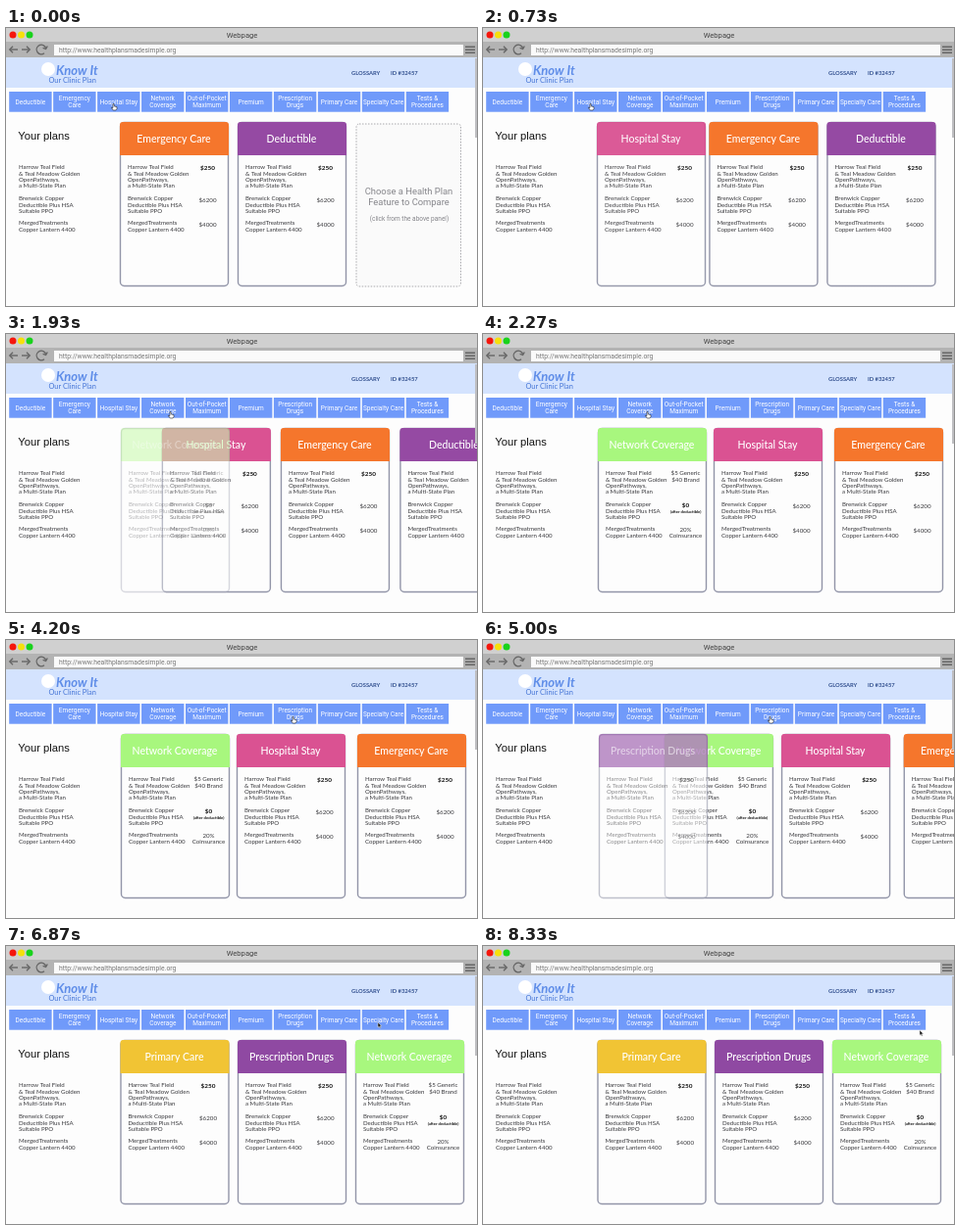
Recreate the animation shown at these times as an HTML page with a canvas. Size 480 by 284 pixels, loop 8.39 s.

```html
<!DOCTYPE html>
<html lang="en">
<head>
<meta charset="utf-8">
<title>Webpage</title>
<style>
html, body { margin: 0; width: 100%; height: 100%; overflow: hidden; background: #fdfdfd; }
canvas { display: block; width: 480px; height: 284px; }
</style>
</head>
<body>
<canvas id="stage"></canvas>
<script>
const LOOP = 8390, W = 480, H = 284;
const canvas = document.getElementById('stage');
const dpr = window.devicePixelRatio || 1;
canvas.width = W * dpr;
canvas.height = H * dpr;
const ctx = canvas.getContext('2d');

const LATO = 'Lato, sans-serif', ROBOTO = 'Roboto, sans-serif';
const ARIAL = '"Liberation Sans", Arial, sans-serif';
const INK = '#38383c';

const NAV = ['Deductible', 'Emergency|Care', 'Hospital Stay', 'Network|Coverage',
  'Out-of-Pocket|Maximum', 'Premium', 'Prescription|Drugs', 'Primary Care',
  'Specialty Care', 'Tests &|Procedures'];

const PLANS = [
  [142, ['Harrow Teal Field', '& Teal Meadow Golden', 'OpenPathways,', 'a Multi-State Plan']],
  [174, ['Brenwick Copper', 'Deductible Plus HSA', 'Suitable PPO']],
  [199, ['MergedTreatments', 'Copper Lantern 4400']]
];

const COLORS = {
  'Deductible': '#954aa3',
  'Emergency Care': '#f5762c',
  'Hospital Stay': '#da5292',
  'Network Coverage': '#a8f77e',
  'Prescription Drugs': '#8f49a2',
  'Primary Care': '#f1c434'
};

// Each step inserts a card on the left and pushes the others right.
const STEPS = [
  { start: -1000, end: -500, xs: [116, 236, 480], cards: ['Emergency Care', 'Deductible'] },
  { start: 270, end: 800, xs: [116, 236, 356], cards: ['Hospital Stay', 'Emergency Care', 'Deductible'] },
  { start: 1720, end: 2240, xs: [117, 235, 358], cards: ['Network Coverage', 'Hospital Stay', 'Emergency Care'] },
  { start: 4700, end: 5250, xs: [118, 236, 356], cards: ['Prescription Drugs', 'Network Coverage', 'Hospital Stay'] },
  { start: 6330, end: 6800, xs: [116.5, 236, 356], cards: ['Primary Care', 'Prescription Drugs', 'Network Coverage'] }
];

const POINTER = [
  [0, 110, 80], [900, 110, 80], [1400, 168, 82], [2900, 168, 82], [3950, 293, 81],
  [5250, 293, 81], [5950, 337, 80], [6500, 337, 80], [6850, 380, 80],
  [7400, 380, 80], [8200, 446, 88]
];
const CLICKS = [80, 1610, 4290, 6120];
const CLICK_LENGTH = 230;

const clamp = v => Math.min(1, Math.max(0, v));
const ease = v => v * v * (3 - 2 * v);
const mix = (a, b, p) => a + (b - a) * p;

function text(str, x, y, size, { color = INK, font = LATO, style = '', align = 'left' } = {}) {
  ctx.font = `${style} ${size}px ${font}`;
  ctx.fillStyle = color;
  ctx.textAlign = align;
  ctx.textBaseline = 'alphabetic';
  ctx.fillText(str, x, y + size * 0.36);
}

function box(x, y, w, h, color) {
  ctx.fillStyle = color;
  ctx.fillRect(x, y, w, h);
}

function disc(x, y, r, color) {
  ctx.fillStyle = color;
  ctx.beginPath();
  ctx.arc(x, y, r, 0, Math.PI * 2);
  ctx.fill();
}

function line(color, width, ...points) {
  ctx.strokeStyle = color;
  ctx.lineWidth = width;
  ctx.beginPath();
  points.forEach(([x, y]) => ctx.lineTo(x, y));
  ctx.stroke();
}

function drawBrowser() {
  box(0, 0, W, 14, '#d0d0d0');
  box(0, 14, W, 16, '#b3b3b3');
  disc(7, 7, 3.5, '#f5160c');
  disc(15.5, 7, 3.5, '#f6e00c');
  disc(24, 7, 3.5, '#19d21c');
  text('Webpage', 240.5, 7.3, 7.6, { font: ROBOTO, color: '#444', align: 'center' });

  const grey = '#666';
  line(grey, 1.4, [12, 22], [4, 22]);
  line(grey, 1.4, [7, 18.8], [3.8, 22], [7, 25.2]);
  line(grey, 1.4, [16, 22], [24, 22]);
  line(grey, 1.4, [21, 18.8], [24.2, 22], [21, 25.2]);
  ctx.beginPath();
  ctx.arc(36, 22, 4.8, 0.9, Math.PI * 1.92);
  ctx.stroke();
  line(grey, 1.4, [42.3, 18.5], [40.6, 21.5], [37.6, 20.4]);

  box(49, 17, 417, 11, '#fafafa');
  text('http://www.healthplansmadesimple.org', 54, 22.4, 6.8, { font: ROBOTO, color: '#777' });
  for (let i = 0; i < 3; i++) box(468, 18.5 + i * 3, 10, 1.5, grey);
}

function drawHeader() {
  box(0, 30, W, 31, '#d4e3fe');
  disc(43, 42, 7, '#ffffff');
  text('Know It', 51, 43.5, 13, { style: 'italic bold', color: '#5f8de8' });
  text('Our Clinic Plan', 43.5, 53.4, 7.4, { color: '#4474d6' });
  const navy = { font: LATO, style: 'bold', color: '#32508f' };
  text('GLOSSARY', 352, 46.3, 5.8, navy);
  text('ID #32457', 392, 46.3, 5.8, navy);
}

function drawNav() {
  NAV.forEach((label, i) => {
    const x = 3.2 + i * 44.95, lines = label.split('|');
    box(x, 65, 43.4, 20.7, '#709afa');
    lines.forEach((str, n) => {
      const y = 75.6 + (n - (lines.length - 1) / 2) * 7;
      text(str, x + 21.7, y, 6.5, { font: ROBOTO, color: '#fff', align: 'center' });
    });
  });
}

function drawPlans(x) {
  for (const [top, lines] of PLANS) {
    lines.forEach((str, i) => text(str, x, top + i * 6.4, 6.1));
  }
}

function drawPrices(name, x) {
  const put = (str, y, size = 6.2, style = '') =>
    text(str, x, y, size, { align: 'center', style, color: style ? '#111' : INK });
  if (name === 'Network Coverage') {
    put('$5 Generic', 142);
    put('$40 Brand', 148.8);
    put('$0', 174.8, 6.4, 'bold');
    put('(after deductible)', 181.5, 4.2, 'bold');
    put('20%', 199.8);
    put('Coinsurance', 206);
  } else {
    put('$250', 143, 6.4, 'bold');
    put('$6200', 175.8);
    put('$4000', 201);
  }
}

function drawCard(name, x, alpha) {
  ctx.save();
  ctx.globalAlpha = alpha;
  ctx.beginPath();
  ctx.roundRect(x + 0.5, 96.5, 110, 167, 4);
  ctx.fillStyle = '#fdfdfd';
  ctx.fill();
  ctx.strokeStyle = '#9295a8';
  ctx.lineWidth = 1.4;
  ctx.stroke();
  ctx.beginPath();
  ctx.roundRect(x, 96, 111, 34, [3, 3, 0, 0]);
  ctx.fillStyle = COLORS[name];
  ctx.fill();
  text(name, x + 55, 113, 10.5, { color: '#fff', align: 'center', style: '500' });
  drawPlans(x + 8);
  drawPrices(name, x + 89.5);
  ctx.restore();
}

function drawPlaceholder(alpha) {
  if (alpha <= 0) return;
  ctx.save();
  ctx.globalAlpha = alpha;
  ctx.beginPath();
  ctx.roundRect(357, 98, 106.5, 166, 3);
  ctx.fillStyle = '#fafafa';
  ctx.fill();
  ctx.setLineDash([1.5, 1.5]);
  ctx.strokeStyle = '#a9a9ad';
  ctx.lineWidth = 1;
  ctx.stroke();
  const note = { font: ROBOTO, color: '#85858a', align: 'center' };
  text('Choose a Health Plan', 410.5, 167, 9.4, note);
  text('Feature to Compare', 410.5, 178, 9.4, note);
  text('(click from the above panel)', 411, 194.8, 6.5, note);
  ctx.restore();
}

function drawCards(t) {
  const index = STEPS.findLastIndex(step => t >= step.start);
  const step = STEPS[index], before = STEPS[index - 1];
  const p = ease(clamp((t - step.start) / (step.end - step.start)));
  if (index < 2) drawPlaceholder(index === 0 ? 1 : 1 - p);
  if (before && p < 1) {
    before.cards.forEach((name, i) => {
      drawCard(name, mix(before.xs[i], step.xs[i + 1] ?? 482, p), 1);
    });
    drawCard(step.cards[0], step.xs[0], p);
  } else {
    step.cards.forEach((name, i) => drawCard(name, step.xs[i], 1));
  }
}

function pointerAt(t) {
  const next = POINTER.findIndex(point => point[0] > t);
  if (next < 0) return POINTER.at(-1).slice(1);
  const [t0, x0, y0] = POINTER[next - 1], [t1, x1, y1] = POINTER[next];
  const p = ease((t - t0) / (t1 - t0));
  return [mix(x0, x1, p), mix(y0, y1, p)];
}

function shape(points, fill, stroke) {
  ctx.beginPath();
  points.forEach(([x, y]) => ctx.lineTo(x, y));
  ctx.closePath();
  ctx.fillStyle = fill;
  ctx.fill();
  ctx.strokeStyle = stroke;
  ctx.lineWidth = 0.6;
  ctx.stroke();
}

function drawPointer(t) {
  const [x, y] = pointerAt(t);
  if (CLICKS.some(start => t >= start && t < start + CLICK_LENGTH)) {
    ctx.beginPath();
    ctx.arc(x, y + 0.5, 5.4, 0, Math.PI * 2);
    ctx.strokeStyle = '#1b2442';
    ctx.lineWidth = 1.3;
    ctx.stroke();
  }
  ctx.save();
  ctx.translate(x, y);
  if (t < 5250) {
    shape([[-1, -2.5], [0, -2.5], [0.3, 0], [3, 0.6], [3, 2.6], [2, 4], [-0.8, 4],
      [-2.6, 1.4], [-1, 1.5]], '#fff', '#222');
  } else {
    shape([[-1, -2], [-1, 3.2], [0.2, 2.2], [1.1, 4], [2, 3.5], [1.2, 1.8], [2.8, 1.7]],
      '#111', '#ddd');
  }
  ctx.restore();
}

function draw(t) {
  ctx.setTransform(dpr, 0, 0, dpr, 0, 0);
  box(0, 0, W, H, '#fdfdfd');
  drawBrowser();
  drawHeader();
  drawNav();
  text('Your plans', 12.3, 110.2, 11.2, { font: ARIAL, color: '#111' });
  drawPlans(13);
  drawCards(t);
  box(478, 31, 2, 81, '#bfbfc2');
  drawPointer(t);
}

const began = performance.now();
function tick() {
  draw((performance.now() - began) % LOOP);
  requestAnimationFrame(tick);
}
tick();
</script>
</body>
</html>
```
